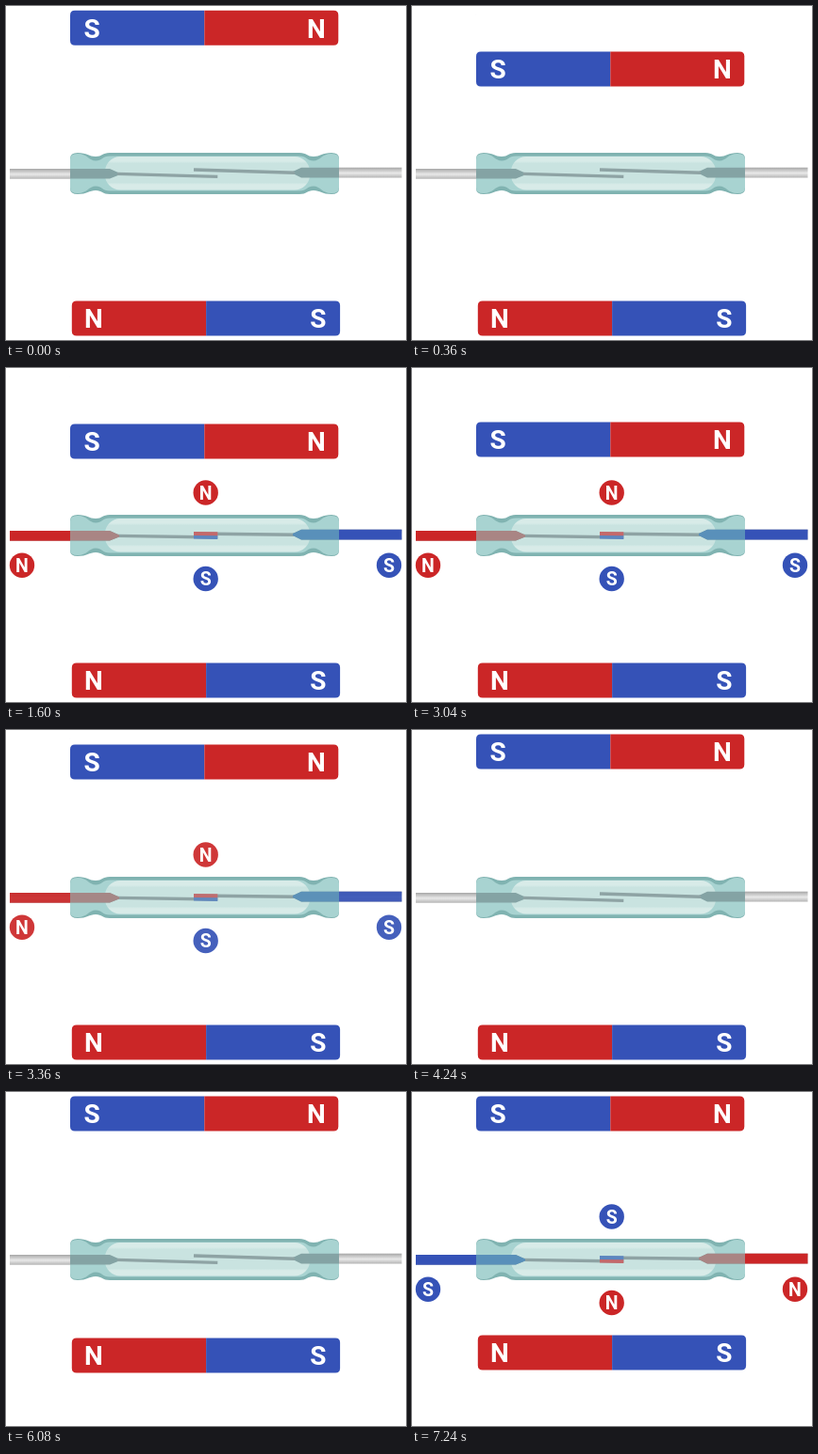
Write an HTML page that moves like this. It is 424 by 355 pixels and loops after 8 s.

```html
<!DOCTYPE html>
<html lang="en">
<head>
<meta charset="utf-8">
<title>Reed switch</title>
<style>
  html, body { margin: 0; width: 100%; height: 100%; overflow: hidden; background: #fff; }
  svg { display: block; width: 100%; height: 100%; }
  text { font-family: Roboto, Arial, sans-serif; font-weight: 700; fill: #fff; text-anchor: middle; }
</style>
</head>
<body>
<svg id="stage" viewBox="0 0 424 355">
  <defs>
    <linearGradient id="metal" x2="0" y2="1">
      <stop offset="0" stop-color="#a6a6a6"/>
      <stop offset=".25" stop-color="#c6c6c6"/>
      <stop offset=".55" stop-color="#e9e9e9"/>
      <stop offset="1" stop-color="#b4b4b4"/>
    </linearGradient>
    <linearGradient id="cavity" x2="0" y2="1">
      <stop offset="0" stop-color="#d8ebe8"/>
      <stop offset=".14" stop-color="#d8ebe8"/>
      <stop offset=".2" stop-color="#c9e3e0"/>
      <stop offset=".78" stop-color="#c9e3e0"/>
      <stop offset=".84" stop-color="#d8ebe8"/>
      <stop offset="1" stop-color="#d8ebe8"/>
    </linearGradient>
  </defs>
</svg>
<script>
(() => {
  const LOOP = 8000, STEP = 40, TRAVEL = 55;
  const RED = { name: 'N', fill: '#cb2627', glass: '#a98584', tip: '#c4696b' };
  const BLUE = { name: 'S', fill: '#3552b7', glass: '#5990ba', tip: '#5c86c0' };
  const METAL = '#84a3a4', BLADE = '#8ea3a4';
  const LEFT_CORE = 'M68 173H110L120 177.5V179.5L110 183.5H68Z';
  const RIGHT_CORE = 'M353 171.8H313L304 176V178L313 182.5H353Z';
  const stage = document.getElementById('stage');

  function add(parent, tag, attrs, text) {
    const el = document.createElementNS('http://www.w3.org/2000/svg', tag);
    for (const key in attrs) el.setAttribute(key, attrs[key]);
    if (text) el.textContent = text;
    parent.appendChild(el);
    return el;
  }

  function magnet(x, y, left, right) {
    const g = add(stage, 'g', {}), mid = x + 142.3, end = x + 284.3;
    add(g, 'path', { fill: left.fill, d: `M${mid} ${y}H${x + 5}q-5 0-5 5v27q0 5 5 5H${mid}Z` });
    add(g, 'path', { fill: right.fill, d: `M${mid} ${y}H${end - 5}q5 0 5 5v27q0 5-5 5H${mid}Z` });
    add(g, 'text', { x: x + 23, y: y + 28.7, 'font-size': 28 }, left.name);
    add(g, 'text', { x: x + 261, y: y + 28.7, 'font-size': 28 }, right.name);
    return g;
  }

  // Tube outline: heights of the ends, the necks and the middle, mirrored below.
  function tube(end, neck, mid) {
    const [e, n, m] = [356 - end, 356 - neck, 356 - mid];
    return `M68 ${end + 6}Q68 ${end} 76 ${end}C86 ${end} 88 ${neck} 95 ${neck}S102 ${mid} 110 ${mid}H311` +
      `C319 ${mid} 319 ${neck} 326 ${neck}S335 ${end} 345 ${end}Q353 ${end} 353 ${end + 6}` +
      `V${e - 6}Q353 ${e} 345 ${e}C335 ${e} 333 ${n} 326 ${n}S319 ${m} 311 ${m}H110` +
      `C102 ${m} 102 ${n} 95 ${n}S86 ${e} 76 ${e}Q68 ${e} 68 ${e - 6}Z`;
  }

  function rods(parent, left, right) {
    add(parent, 'rect', { x: 4, y: 173, width: 64, height: 10.7, fill: left });
    add(parent, 'rect', { x: 353, y: 171.7, width: 66.5, height: 10.8, fill: right });
  }

  function cores(parent, left, right) {
    add(parent, 'path', { d: LEFT_CORE, fill: left });
    add(parent, 'path', { d: RIGHT_CORE, fill: right });
  }

  const line = (parent, stroke, width) => add(parent, 'line', { stroke, 'stroke-width': width });

  function badge(parent, x, y, pole) {
    add(parent, 'circle', { cx: x, cy: y, r: 13.2, fill: pole.fill });
    add(parent, 'text', { x, y: y + 7, 'font-size': 19.5 }, pole.name);
  }

  function poles(left, right) {
    const g = add(stage, 'g', {});
    rods(g, left.fill, right.fill);
    cores(g, left.glass, right.glass);
    badge(g, 17, 209.7, left);
    badge(g, 406, 209.7, right);
    badge(g, 211.7, 132.5, left);
    badge(g, 211.7, 224, right);
    return { g, low: line(g, right.tip, 4), high: line(g, left.tip, 4) };
  }

  rods(stage, 'url(#metal)', 'url(#metal)');
  add(stage, 'path', { d: tube(156, 160, 156), fill: '#80b3b1' });
  add(stage, 'path', { d: tube(157, 164.5, 159.5), fill: '#a8d3d1' });
  add(stage, 'rect', { x: 105, y: 160, width: 217, height: 35.5, rx: 16, fill: 'url(#cavity)' });
  cores(stage, METAL, METAL);
  const lowBlade = line(stage, BLADE, 3.4), highBlade = line(stage, BLADE, 3.4);
  const first = poles(RED, BLUE), second = poles(BLUE, RED);
  const topMagnet = magnet(68, 4.5, BLUE, RED);
  const bottomMagnet = magnet(69.8, 313.5, RED, BLUE);

  const ramp = (t, start, length) => Math.min(1, Math.max(0, (t - start) / length));
  const slide = (t, start) => (1 - Math.cos(Math.PI * ramp(t, start, 550))) / 2;
  const fade = (t, start) => ramp(t, start, 480);

  function place(el, x1, y1, x2, y2) {
    Object.entries({ x1, y1, x2, y2 }).forEach(([k, v]) => el.setAttribute(k, v));
  }

  // Lays a blade from its root to its free end, plus the coloured overlap.
  function bend(blade, tips, x0, y0, x1, y1, from) {
    const y = y0 + (y1 - y0) * (from - x0) / (x1 - x0);
    place(blade, x0, y0, x1, y1);
    tips.forEach(tip => place(tip, from, y, x1, y1));
  }

  function draw(t) {
    const closed = (t >= 1600 && t < 4240) || t >= 7240;
    const down = TRAVEL * (slide(t, -28) - slide(t, 2972));
    const up = TRAVEL * slide(t, 5612);
    topMagnet.setAttribute('transform', `translate(0 ${down})`);
    bottomMagnet.setAttribute('transform', `translate(0 ${-up})`);
    bend(lowBlade, [first.low, second.low], 118, 178.4, 224.3, closed ? 180 : 181.4, 199);
    bend(highBlade, [first.high, second.high], 306, 177.2, 199, closed ? 176 : 174, 224.3);
    first.g.setAttribute('opacity', fade(t, 720) - fade(t, 3320));
    second.g.setAttribute('opacity', fade(t, 6360));
  }

  const begin = performance.now();
  function tick() {
    const t = (performance.now() - begin) % LOOP;
    draw(Math.floor(t / STEP) * STEP);
    requestAnimationFrame(tick);
  }
  tick();
})();
</script>
</body>
</html>
```
